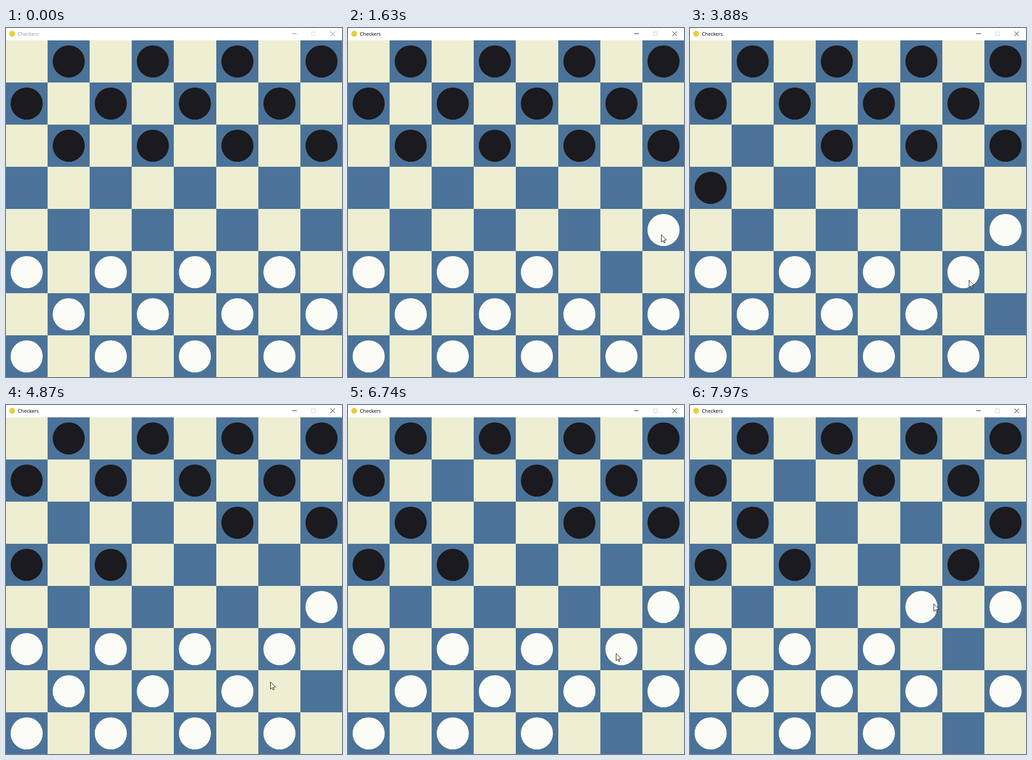
Write an HTML page with a canvas that moves like this. It is 735x762 px and loops after 8 s.

```html
<!DOCTYPE html>
<html lang="en">
<head>
<meta charset="utf-8">
<title>Checkers</title>
<style>
  html, body { margin: 0; width: 100%; height: 100%; overflow: hidden; background: #fff; }
  canvas { display: block; }
</style>
</head>
<body>
<canvas id="stage" width="735" height="762"></canvas>
<script>
const ctx = document.getElementById('stage').getContext('2d');
const LOOP = 8000, FOCUS_AT = 690, REPLY = 230, GLIDE = 350;
const TOP = 27, ROW = 92, COL = 92.14;
const CREAM = '#eeeed3', BLUE = '#4b7399', BLACK = '#1b1a1e', WHITE = '#fcfcf7';

// white steps up and black answers down: column, row, sideways step
const turns = [
  { at: 1520, white: [6, 5, 1], black: [1, 2, -1] },
  { at: 3830, white: [7, 6, -1], black: [3, 2, -1] },
  { at: 5400, white: [6, 7, 1], black: [2, 1, -1] },
  { at: 7200, white: [6, 5, -1], black: [5, 2, 1] }
];

// pointer stops: arrival time, x, y
const stops = [
  [310, 363, 741], [480, 622, 522], [1000, 650, 500], [1310, 726, 455],
  [1630, 685, 451], [2010, 502, 601], [2900, 560, 487], [3220, 655, 622],
  [3820, 610, 550], [4210, 600, 533], [4540, 553, 596], [4870, 578, 604],
  [5070, 588, 702], [5400, 725, 630], [5850, 548, 617], [6380, 512, 590],
  [6740, 586, 542], [7200, 505, 448], [7640, 441, 531], [7800, 441, 531],
  [7970, 533, 434]
];

// rest at each stop, then glide so as to arrive on time
function pointer(t) {
  const next = stops.findIndex(s => s[0] > t);
  if (next < 0) return stops[stops.length - 1].slice(1);
  const [t0, x0, y0] = stops[next - 1], [t1, x1, y1] = stops[next];
  const u = Math.max(0, 1 - (t1 - t) / Math.min(GLIDE, t1 - t0));
  const k = u * u * (3 - 2 * u);
  return [Math.round(x0 + (x1 - x0) * k), Math.round(y0 + (y1 - y0) * k)];
}

const isDark = (c, r) => (c + r) % 2 === 1;
const colX = c => Math.round(c * COL - 1.1);

function step(cells, [c, r, side], down) {
  const from = r * 8 + c;
  cells[from + down * 8 + side] = cells[from];
  cells[from] = null;
}

function board(t) {
  const cells = Array.from({ length: 64 }, (_, i) => {
    const c = i % 8, r = i >> 3;
    return !isDark(c, r) ? null : r < 3 ? BLACK : r > 4 ? WHITE : null;
  });
  for (const { at, white, black } of turns) {
    if (t >= at) step(cells, white, -1);
    if (t >= at + REPLY) step(cells, black, 1);
  }
  return cells;
}

function disc(x, y, r, color) {
  ctx.fillStyle = color;
  ctx.beginPath();
  ctx.arc(x, y, r, 0, Math.PI * 2);
  ctx.fill();
}

function drawBoard(t) {
  board(t).forEach((piece, i) => {
    const c = i % 8, r = i >> 3;
    const x = colX(c), y = TOP + r * ROW;
    ctx.fillStyle = isDark(c, r) ? BLUE : CREAM;
    ctx.fillRect(x, y, colX(c + 1) - x, ROW);
    if (piece) disc(x + 46.2, y + 46, 35.1, piece);
  });
}

function line(x0, y0, x1, y1) {
  ctx.beginPath();
  ctx.moveTo(x0, y0);
  ctx.lineTo(x1, y1);
  ctx.stroke();
}

function drawTitle(active) {
  ctx.fillStyle = '#fff';
  ctx.fillRect(0, 0, 735, TOP);
  disc(13.5, 12.5, 6.5, '#e6cf3c');
  ctx.fillStyle = active ? '#000' : '#999';
  ctx.font = '10.8px "Open Sans", "Noto Sans", sans-serif';
  ctx.fillText('Checkers', 26, 17);

  ctx.lineWidth = 1;
  ctx.strokeStyle = active ? '#000' : '#777';
  line(626, 12.5, 636, 12.5);
  line(709.5, 7.5, 719.5, 17.5);
  line(719.5, 7.5, 709.5, 17.5);
  ctx.strokeStyle = active ? '#ccc' : '#ddd';
  ctx.strokeRect(668.5, 8.5, 8, 8);
}

function drawPointer(x, y) {
  ctx.save();
  ctx.translate(x, y);
  const arrow = new Path2D('M.5 .5V16.5L4.1 13.1 6.5 18.3 8.7 17.3 6.4 12.2 11.5 11.8Z');
  ctx.fillStyle = '#fff';
  ctx.fill(arrow);
  ctx.strokeStyle = '#000';
  ctx.lineWidth = 1;
  ctx.stroke(arrow);
  ctx.restore();
}

function draw(t) {
  drawBoard(t);
  drawTitle(t >= FOCUS_AT);
  if (t >= stops[0][0]) drawPointer(...pointer(t));
}

let start = null;
function tick(now) {
  if (start === null) start = now;
  draw((now - start) % LOOP);
  requestAnimationFrame(tick);
}
draw(0);
requestAnimationFrame(tick);
</script>
</body>
</html>
```
